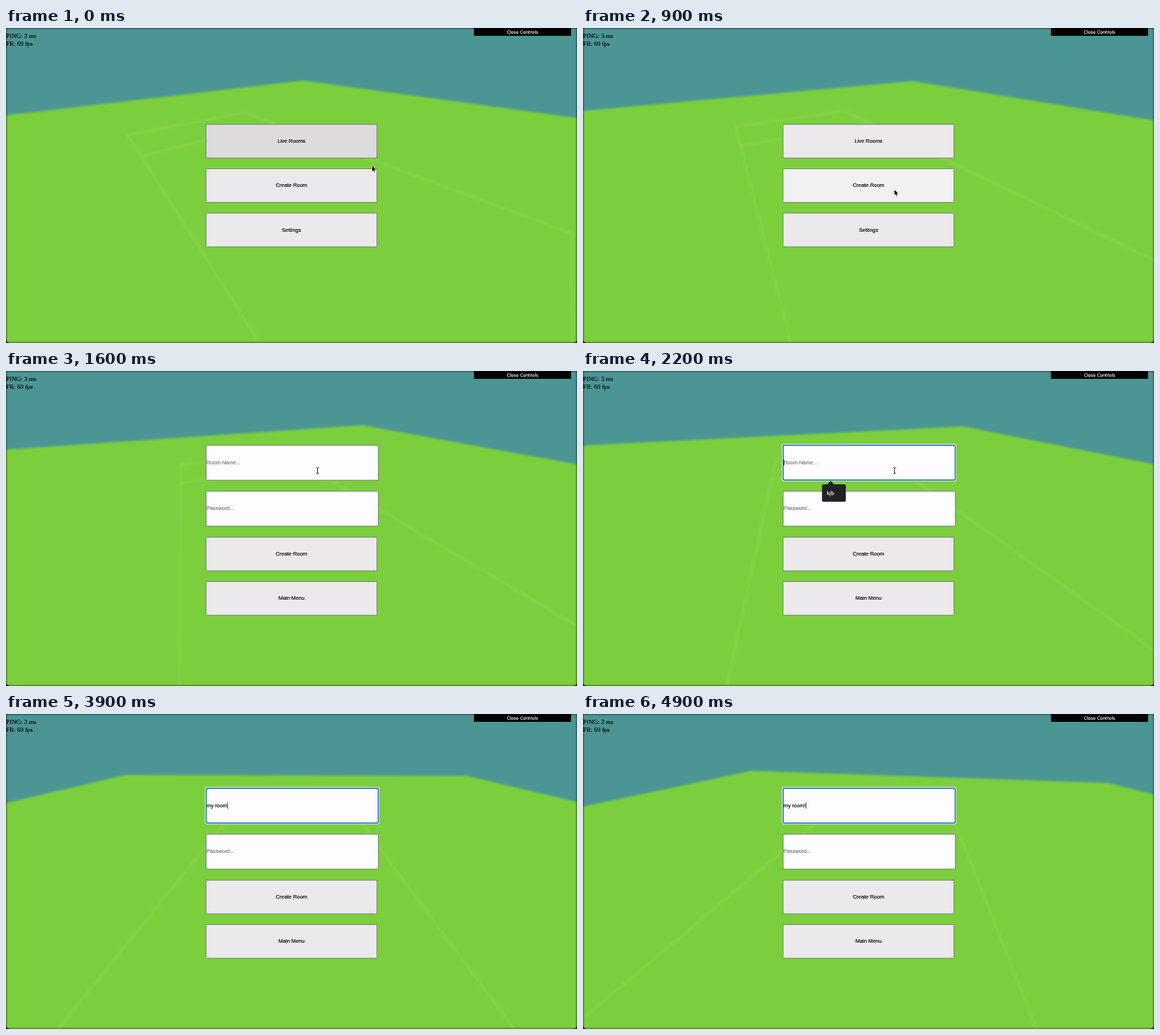
Recreate the animation shown at these times as an HTML page with a canvas. Size 800 by 442 pixels, loop 5000 ms.

```html
<!DOCTYPE html>
<html lang="en">
<head>
<meta charset="utf-8">
<title>Room menu</title>
<style>
  html, body { margin: 0; width: 100%; height: 100%; overflow: hidden; background: #000; }
  #view, canvas { position: absolute; left: 0; top: 0; width: 800px; height: 442px; }
  #view { overflow: hidden; border-radius: 0 0 5px 5px; }
  #scene { filter: blur(1.8px); }
</style>
</head>
<body>
<div id="view"><canvas id="scene"></canvas></div>
<canvas id="ui"></canvas>
<script>
const W = 800, H = 442, LOOP = 5000, STEP = 100;
const SANS = '7.4px "Liberation Sans", Arial, sans-serif';
const SERIF = '8.88px "Liberation Serif", "Times New Roman", serif';
const dpr = window.devicePixelRatio || 1;

function layer(id) {
  const c = document.getElementById(id);
  c.width = W * dpr;
  c.height = H * dpr;
  const g = c.getContext('2d');
  g.scale(dpr, dpr);
  return g;
}
const scene = layer('scene'), ui = layer('ui');

function trace(g, pts) {
  g.beginPath();
  pts.forEach(([x, y], i) => i ? g.lineTo(x, y) : g.moveTo(x, y));
}

// Orbiting camera; lengths are in units of the camera height.
const FOCAL = H / 2 / Math.tan(75 / 2 * Math.PI / 180);
const PITCH = Math.atan(0.664), BACK = 1.6, NEAR = 0.05;
const SPIN = 10.9, START = -41.5;   // degrees per second, degrees
const GROUND = 5.08;
const PITCH_SIDE = 0.93, PITCH_TOP = 2.4, PITCH_END = -1.7, BOX_LINE = 1.5;

function toCamera([x, z], yaw) {
  const right = x * Math.cos(yaw) + z * Math.sin(yaw);
  const ahead = z * Math.cos(yaw) - x * Math.sin(yaw) + BACK;
  const c = Math.cos(PITCH), s = Math.sin(PITCH);
  return [right, c - ahead * s, ahead * c + s];
}

// Closed outline on the ground, cut at the near plane and projected.
function project(corners, yaw) {
  const pts = corners.map(p => toCamera(p, yaw)), out = [];
  pts.forEach((a, i) => {
    const b = pts[(i + 1) % pts.length];
    if (a[2] >= NEAR) out.push(a);
    if (a[2] >= NEAR !== b[2] >= NEAR) {
      const k = (NEAR - a[2]) / (b[2] - a[2]);
      out.push(a.map((v, j) => v + (b[j] - v) * k));
    }
  });
  return out.map(([x, y, z]) => [W / 2 + FOCAL * x / z, H / 2 + FOCAL * y / z]);
}

const rect = (side, top, end) => [[-side, top], [side, top], [side, end], [-side, end]];

function drawField(t) {
  const g = scene, yaw = (START + SPIN * t / 1000) * Math.PI / 180;
  g.fillStyle = '#4b9694';
  g.fillRect(0, 0, W, H);

  trace(g, project(rect(GROUND, GROUND, -GROUND), yaw));
  g.fillStyle = '#7bcf3c';
  g.fill();

  g.strokeStyle = 'rgba(255,255,255,0.08)';
  g.lineWidth = 3.2;
  for (const end of [PITCH_END, BOX_LINE]) {
    trace(g, project(rect(PITCH_SIDE, end === BOX_LINE ? BOX_LINE : PITCH_TOP, end), yaw));
    g.closePath();
    g.stroke();
  }
}

function text(str, x, y, font, color, align = 'left', weight = 0.15) {
  ui.font = font;
  ui.fillStyle = ui.strokeStyle = color;
  ui.textAlign = align;
  ui.lineWidth = weight;
  ui.fillText(str, x, y);
  ui.strokeText(str, x, y);
}

function box(x, y, w, h, r, fill, stroke, line = 0.8) {
  ui.beginPath();
  ui.roundRect(x, y, w, h, r);
  ui.fillStyle = fill;
  ui.fill();
  if (stroke) {
    ui.strokeStyle = stroke;
    ui.lineWidth = line;
    ui.stroke();
  }
}

const FILLS = { idle: '#ebe9eb', hover: '#dddbdd', down: '#f2f1f2' };

function button(label, y, state = 'idle') {
  box(280.3, y + 0.3, 239.4, 47.2, 1.3, FILLS[state], '#6c6c6c');
  text(label, 400, y + 26.1, SANS, '#000', 'center');
}

function field(y, hint, value, focused, caret) {
  if (focused) {
    box(278.8, y - 1.2, 244.2, 51.8, 2, '#fff');
    box(280.5, y + 0.5, 241, 48.7, 1, '#fdfcfe', '#1b62bd', 1.5);
  } else {
    box(280.4, y + 0.4, 241.3, 49, 0.6, '#fdfcfe', '#666');
  }
  text(value || hint, 281, y + 27.1, SANS, value ? '#000' : '#757575');
  if (caret) {
    const x = 281.2 + (value ? ui.measureText(value).width : 0);
    ui.fillStyle = '#000';
    ui.fillRect(x, y + 20.4, 0.7, 8.4);
  }
}

function suggestion() {
  trace(ui, [[341.5, 160], [347, 154], [352.5, 160]]);
  ui.fillStyle = '#222224';
  ui.fill();
  box(334.8, 159, 33.4, 24.4, 2.5, '#222224');
  text('kjb', 341.8, 173.6, '7.3px Inter, sans-serif', '#fff');
}

function arrow(x, y) {
  trace(ui, [
    [0, 0], [0, 7.4], [1.6, 5.9], [2.8, 8.5],
    [3.9, 8], [2.8, 5.5], [5.1, 5.4]
  ].map(([dx, dy]) => [x + dx, y + dy]));
  ui.closePath();
  ui.strokeStyle = '#fff';
  ui.lineWidth = 1;
  ui.stroke();
  ui.fillStyle = '#000';
  ui.fill();
}

function beam(x, y) {
  ui.strokeStyle = '#111';
  ui.lineWidth = 0.9;
  trace(ui, [[x, y - 3.6], [x, y + 3.6]]);
  ui.stroke();
  for (const s of [-1, 1]) {
    trace(ui, [[x - 1.9, y + s * 4.2], [x, y + s * 3.5], [x + 1.9, y + s * 4.2]]);
    ui.stroke();
  }
}

const SWAP = 1000, FOCUS = 2000, TYPE = 2500, KEY_GAP = 200;
const PHRASE = 'my room!';

function ease(t, from, to) {
  const k = Math.min(1, Math.max(0, (t - from) / (to - from)));
  return k * k * (3 - 2 * k);
}

function pointer(t) {
  const down = ease(t, -300, 600), start = ease(0, -300, 600);
  const k = (down - start) / (1 - start);
  return [513 - 76.5 * k, 193.5 + 33.5 * k - 87.3 * ease(t, 1100, 1500)];
}

function drawUi(t) {
  ui.clearRect(0, 0, W, H);
  const ping = t >= 500 && t < 3500 ? 3 : 2;
  text(`PING: ${ping} ms`, 0, 13.7, SERIF, '#000');
  text('FR: 60 fps', 0, 24.6, SERIF, '#000');
  ui.fillStyle = '#000';
  ui.fillRect(655.6, 0, 136, 11);
  text('Close Controls', 723.5, 7.6, '6.1px "DejaVu Sans", sans-serif', '#fff', 'center');

  const [x, y] = pointer(t);
  if (t < SWAP) {
    const over = y >= 197;
    button('Live Rooms', 134.9, over ? 'idle' : 'hover');
    button('Create Room', 197.2, t >= 800 ? 'down' : over ? 'hover' : 'idle');
    button('Settings', 259.5);
    arrow(x, y);
    return;
  }

  const typed = PHRASE.slice(0, Math.max(0, Math.floor((t - TYPE) / KEY_GAP)));
  const focused = t >= FOCUS;
  field(103.8, 'Room Name...', typed, focused, focused);
  field(168.3, 'Password...', '');
  button('Create Room', 232.9);
  button('Main Menu', 295.2);
  if (typed) return;
  if (focused) suggestion();
  const onField = y < 153 || (y > 168 && y < 218);
  (onField ? beam : arrow)(x, y);
}

let last = -1;
function tick() {
  const t = Math.floor(performance.now() % LOOP / STEP) * STEP;
  if (t !== last) {
    drawField(t);
    drawUi(t);
    last = t;
  }
  requestAnimationFrame(tick);
}
tick();
</script>
</body>
</html>
```
